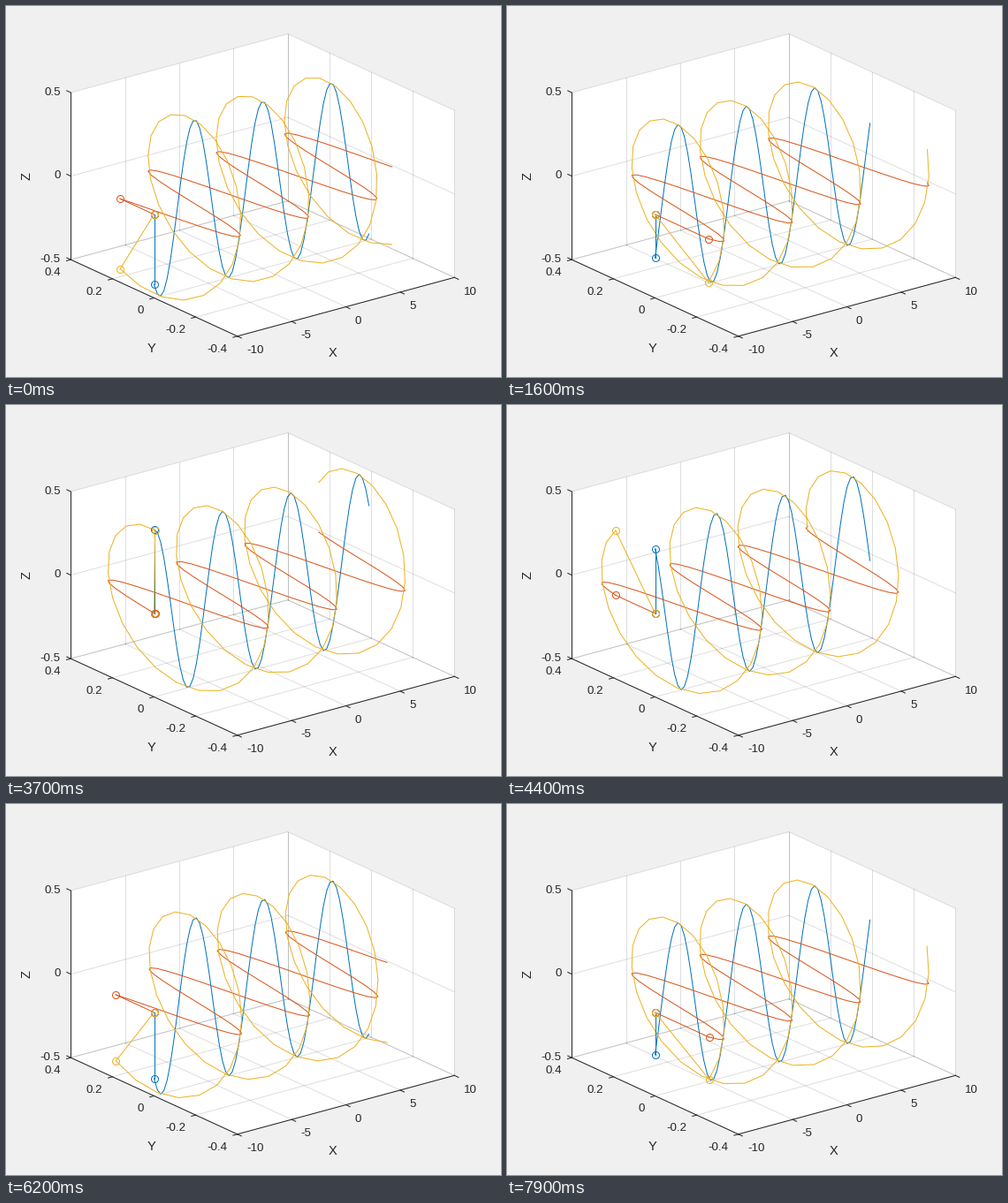
Write a matplotlib script that moves like this. It is 560 by 420 pixels and loops after 8 s.

```python
import numpy as np
import matplotlib.pyplot as plt
from matplotlib.animation import FuncAnimation

W, H, DPI = 560, 420, 100
PX = 72 / DPI                      # one pixel in points
FRAMES, INTERVAL = 80, 100
BLUE, RED, GOLD = "#0072BD", "#D95319", "#EDB120"
INK = "#262626"

# Orthographic view (azimuth -37.5, elevation 30) stretched to fill the axes.
AZ, EL = np.radians(37.5), np.radians(30)
wide = 434 / (np.cos(AZ) + np.sin(AZ))
tall = 342.3 / (np.sin(EL) * (np.cos(AZ) + np.sin(AZ)) + np.cos(EL))
EX = np.array([wide * np.cos(AZ), -tall * np.sin(EL) * np.sin(AZ)])
EY = np.array([-wide * np.sin(AZ), -tall * np.sin(EL) * np.cos(AZ)])
EZ = np.array([0, -tall * np.cos(EL)])
CORNER = np.array([73.3 - EY[0], 373.8])

XT = [-10, -5, 0, 5, 10]
YT = [-0.4, -0.2, 0, 0.2, 0.4]
ZT = [-0.5, 0, 0.5]


def project(x, y, z):
    """Data coordinates to stage pixels, as an (n, 2) array."""
    x, y, z = np.broadcast_arrays(*np.atleast_1d(x, y, z))
    u, v, w = (x + 10) / 20, (y + 0.4) / 0.8, z + 0.5
    return CORNER + np.outer(u, EX) + np.outer(v, EY) + np.outer(w, EZ)


plt.rcParams["font.family"] = "Liberation Sans"
fig = plt.figure(figsize=(W / DPI, H / DPI), dpi=DPI, facecolor="#f0f0f0")
ax = fig.add_axes([0, 0, 1, 1])
ax.set(xlim=(0, W), ylim=(H, 0))
ax.axis("off")


def segment(a, b, **style):
    p = np.vstack([project(*a), project(*b)])
    ax.plot(p[:, 0], p[:, 1], lw=PX, **style)


def tick(point, direction):
    p = project(*point)[0]
    q = p + 5 * direction / np.hypot(*direction)
    ax.plot([p[0], q[0]], [p[1], q[1]], color=INK, lw=PX)


def label(x, y, text, size=13.33, **kw):
    ax.text(x, y + 0.36 * size, text, color=INK, fontsize=size * PX,
            va="baseline", **kw)


def draw_box():
    walls = [
        [(-10, .4, -.5), (10, .4, -.5), (10, .4, .5), (-10, .4, .5)],
        [(10, -.4, -.5), (10, .4, -.5), (10, .4, .5), (10, -.4, .5)],
        [(-10, -.4, -.5), (10, -.4, -.5), (10, .4, -.5), (-10, .4, -.5)],
    ]
    for wall in walls:
        pts = np.vstack([project(*c) for c in wall])
        ax.fill(pts[:, 0], pts[:, 1], color="white", lw=0.5)

    grid = dict(color=INK, alpha=0.15)
    for x in XT:
        segment((x, .4, -.5), (x, .4, .5), **grid)
        segment((x, -.4, -.5), (x, .4, -.5), **grid)
    for y in YT:
        segment((10, y, -.5), (10, y, .5), **grid)
        segment((-10, y, -.5), (10, y, -.5), **grid)
    for z in ZT:
        segment((-10, .4, z), (10, .4, z), **grid)
        segment((10, -.4, z), (10, .4, z), **grid)

    segment((-10, .4, -.5), (-10, .4, .5), color=INK)
    segment((-10, .4, -.5), (-10, -.4, -.5), color=INK)
    segment((-10, -.4, -.5), (10, -.4, -.5), color=INK)


def draw_ticks():
    for x in XT:
        p = project(x, -.4, -.5)[0]
        tick((x, -.4, -.5), -EY)
        label(p[0] + 10.3, p[1] + 14.5, f"{x}", ha="left")
    for y in YT:
        p = project(-10, y, -.5)[0]
        tick((-10, y, -.5), -EX)
        label(p[0] - 11.5, p[1] + 13, f"{y:g}", ha="right")
    for z in ZT:
        p = project(-10, .4, z)[0]
        tick((-10, .4, z), EY)
        label(p[0] - 11.5, p[1] - 2, f"{z:g}", ha="right")
    label(370, 391.5, "X", 14.67, ha="center")
    label(164, 386.5, "Y", 14.67, ha="center")
    ax.text(31, 192.5, "Z", color=INK, fontsize=14.67 * PX, rotation=90,
            ha="right", va="center")


draw_box()
draw_ticks()

COLORS = (BLUE, RED, GOLD)
waves = [ax.plot([], [], color=c, lw=PX)[0] for c in COLORS]
stems = [ax.plot([], [], color=c, lw=PX)[0] for c in COLORS]
ring = dict(marker="o", ms=8 * PX, mfc="none", mew=PX, ls="none")
base = project(-10, 0, 0)[0]
for c in COLORS:
    ax.plot(*base, mec=c, **ring)
tips = [ax.plot([], [], mec=c, **ring)[0] for c in COLORS]

S = 0.3 * np.arange(67)            # distance along the x axis
PHASE = 27.7                       # phase at the start of the loop


def update(n):
    a = PHASE + 0.1 * n + S
    y, z = 0.3 * np.sin(a), 0.5 * np.cos(a)
    paths = [project(S - 10, 0, z), project(S - 10, y, 0),
             project(S - 10, y, z)]
    for p, wave, stem, tip in zip(paths, waves, stems, tips):
        wave.set_data(p[:, 0], p[:, 1])
        stem.set_data([base[0], p[0, 0]], [base[1], p[0, 1]])
        tip.set_data(p[:1, 0], p[:1, 1])
    return waves + stems + tips


anim = FuncAnimation(fig, update, frames=FRAMES, interval=INTERVAL,
                     init_func=lambda: update(0), repeat=True, blit=False)
plt.show()
```
